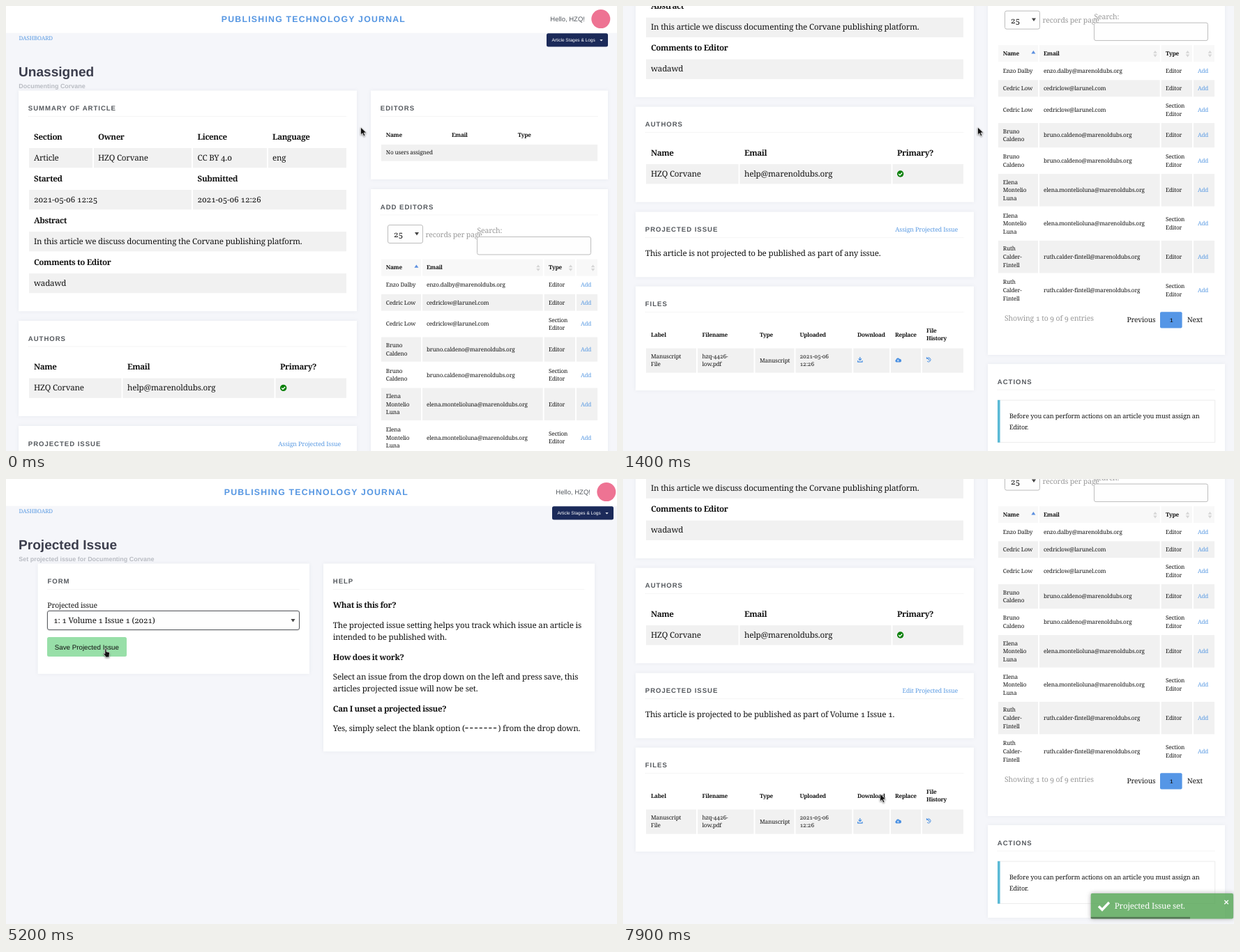
An HTML page for the animation above (8000 ms loop, 876 by 639 pixels).

```html
<!DOCTYPE html>
<html lang="en">
<head>
<meta charset="utf-8">
<title>Projected issue</title>
<style>
html, body { margin: 0; width: 100%; height: 100%; overflow: hidden; background: #f5f6fa; }
svg { display: block; width: 876px; height: 639px; }
text { font-family: "Noto Serif", serif; font-size: 11.6px; letter-spacing: -.016em; fill: #141414;
  font-variant-numeric: oldstyle-nums; text-rendering: geometricPrecision; white-space: pre; }
.b { font-weight: 700; letter-spacing: -.033em; }
.c { font-size: 9.2px; }
.s { font-size: 8.2px; letter-spacing: -.02em; }
.sb { font-size: 8.2px; font-weight: 700; letter-spacing: -.033em; }
.pick { font-size: 11.4px; font-weight: 500; }
.lab { font-size: 10.4px; }
.gray { font-size: 10.5px; fill: #999; }
.page { font-size: 10.1px; }
.link { fill: #5b9be3; }
.go { font-size: 8.8px; }
.crumb { font-size: 8px; }
.dash { font-size: 1.4em; letter-spacing: .108em; }
.sans, .title, .cap, .h1, .sub, .hello, .menu, .save { font-family: "Liberation Sans", Arial, sans-serif; letter-spacing: 0; }
.title { font-size: 12.3px; font-weight: 700; letter-spacing: .1em; fill: #5596e2; }
.cap { font-size: 9.6px; font-weight: 700; letter-spacing: .1em; fill: #55595e; }
.h1 { font-size: 19.1px; font-weight: 700; fill: #3c3e4d; }
.sub { font-size: 8.95px; font-weight: 700; fill: #b9bcc3; }
.hello { font-size: 9.5px; fill: #555a60; }
.menu { font-size: 6.5px; fill: #fff; }
.save { font-size: 9.75px; fill: #111; }
.opt { font: 10.8px "Noto Sans", "Open Sans", sans-serif; letter-spacing: 0; fill: #3a3c40; }
.toast { fill: #fff; }
.card { fill: #fff; filter: drop-shadow(0 0 2.5px rgba(40, 50, 90, .07)); }
.rule { stroke: #e6e6e6; stroke-width: .8; stroke-dasharray: 1 1; }
.cell { fill: #f1f1f1; }
.box { fill: #fefefe; stroke: #bdbdbd; }
.focus { stroke: #5c5e63; filter: drop-shadow(0 0 1.3px rgba(0, 0, 0, .25)); }
.pop { filter: drop-shadow(0 2px 3px rgba(0, 0, 0, .35)); }
.ico { fill: none; stroke: #4a90e2; stroke-width: 1.2; }
</style>
</head>
<body>
<svg id="stage" viewBox="0 0 876 639"></svg>
<script>
const T = (x, y, s, cls = "", attr = "") => `<text x="${x}" y="${y}" class="${cls}" ${attr}>${s.replace(/&/g, "&amp;")}</text>`;
const R = (x, y, w, h, attr) => `<rect x="${x}" y="${y}" width="${w}" height="${h}" ${attr}/>`;
const P = (d, attr) => `<path d="${d}" ${attr}/>`;
const G = (id, body, attr = "") => `<g id="${id}" ${attr}>${body}</g>`;
const rule = (x1, x2, y) => P(`M${x1} ${y}H${x2}`, 'class="rule"');

// Table row: shaded cells between the given edges, with thin gaps.
const cells = (y, h, edges, fill = "") => edges.slice(1).map((e, i) => {
  const x = edges[i] + (i ? 1 : 0), end = e - (i < edges.length - 2 ? 1 : 0);
  return R(x, y, end - x, h, fill || 'class="cell"');
}).join("");
const line = (y, cls, items) => items.map(([x, s]) => T(x, y, s, cls)).join("");

// Lines of text centred on y.
const stack = (x, y, s, cls = "s") => s.split("|").map((p, i, all) =>
  T(x, (y + 3 + (i - (all.length - 1) / 2) * 11.6).toFixed(1), p, cls)).join("");

const card = (x, y, w, h, title) =>
  R(x, y, w, h, 'class="card"') + T(x + 13.8, y + 28.5, title, "cap") + rule(x + 14, x + w - 14.5, y + 37);
const down = (x, y) => P(`M${x - 3} ${y - 2}h6l-3 4.4z`, 'fill="#444"');

function head(dx, title, sub) {
  const w = dx * 8;
  return R(0, 0, 876, 38.7, 'fill="#fff"')
    + T(308.8 + dx * 4, 23.2, "PUBLISHING TECHNOLOGY JOURNAL", "title")
    + T(780.3 + w, 21.8, "Hello, HZQ!", "hello")
    + `<circle cx="${852.8 + w}" cy="18.6" r="13.5" fill="#ee7393"/>`
    + R(775 + w, 39.3, 88, 19.3, 'rx="2.5" fill="#1b2a59"')
    + T(782.5 + w, 51.3, "Article Stages & Logs", "menu")
    + P(`M${851.3 + w} 48.2h4.4l-2.2 2.4z`, 'fill="#fff"')
    + T(18.5, 48.6, "DASHBOARD", "crumb link")
    + T(18, 101.2, title, "h1") + T(18.3, 117.6, sub, "sub");
}

function summary() {
  return card(18, 121.5, 485, 316.8, "SUMMARY OF ARTICLE")
    + line(191.8, "b", [[40, "Section"], [132, "Owner"], [274.5, "Licence"], [382, "Language"]])
    + cells(204, 28.3, [33, 125, 267, 375, 488])
    + line(221.8, "", [[40, "Article"], [132, "HZQ Corvane"], [274.5, "CC BY 4.0"], [382, "eng"]])
    + line(251.8, "b", [[40, "Started"], [274.5, "Submitted"]])
    + cells(264, 28.3, [33, 267, 488])
    + line(282, "", [[40, "2021-05-06 12:25"], [274.5, "2021-05-06 12:26"]])
    + T(40, 311.8, "Abstract", "b") + cells(324, 28.3, [33, 488])
    + T(40, 341.8, "In this article we discuss documenting the Corvane publishing platform.")
    + T(40, 371.8, "Comments to Editor", "b")
    + G("row", cells(384, 28.3, [33, 488], " ")) + T(40, 401.8, "wadawd");
}

function authors() {
  return card(18, 452, 485, 137, "AUTHORS")
    + line(522.4, "b", [[40, "Name"], [174, "Email"], [393, "Primary?"]])
    + cells(534.5, 28.3, [33, 166.5, 385.5, 488])
    + line(552.4, "", [[40, "HZQ Corvane"], [174, "help@marenoldubs.org"]])
    + '<circle cx="397.7" cy="548.4" r="4.7" fill="#0a800a"/>'
    + P("M395.2 548.5l1.8 1.8 3.2-3.3", 'fill="none" stroke="#fff" stroke-width="1.4"');
}

const issue = (id, link, text) => G(id,
  T(480, 631.7, link, "go link", 'text-anchor="end"') + T(32, 666.9, text));

function files() {
  const cols = [40, 113.5, 196, 253.5, 336, 390, 435];
  const names = ["Label", "Filename", "Type", "Uploaded", "Download", "Replace", "File|History"];
  const vals = ["Manuscript|File", "hzq-4426-|low.pdf", "Manuscript", "2021-05-06|12:26"];
  return card(18, 710, 485, 149.5, "FILES")
    + names.map((s, i) => stack(cols[i], 779, s, "sb")).join("")
    + cells(799, 35, [33, 106, 188.5, 246.5, 329.3, 383, 428, 488])
    + vals.map((s, i) => stack(cols[i], 816, s)).join("")
    + P("M339.8 811.5v4.4m-2.2-2.2l2.2 2.3 2.2-2.3M336.7 816.5v2h6.3v-2", 'class="ico"')
    + P("M392 819a2 2 0 0 1-.4-3.8 2.6 2.6 0 0 1 4.8-1 2.4 2.4 0 0 1 .6 4.8z", 'fill="#4a90e2"')
    + P("M394.3 818v-2.6m-1.2 1.2l1.2-1.2 1.2 1.2", 'fill="none" stroke="#fff" stroke-width=".8"')
    + P("M435.8 813.4a3 3 0 1 1 .3 4.2M435.4 811.6v2.3h2.2M438.3 813.6v2.2h1.5", 'class="ico" style="stroke-width:1"');
}

function sorter(x) {
  return P(`M${x - 2.8} 375.2h5.6l-2.8-3.8zM${x - 2.8} 377h5.6l-2.8 3.8z`, 'fill="#d6d6d6"');
}

const people = [
  ["Enzo Dalby", "enzo.dalby@marenoldubs.org", "E"],
  ["Cedric Low", "cedriclow@larunel.com", "ES"],
  ["Bruno|Caldeno", "bruno.caldeno@marenoldubs.org", "ES"],
  ["Elena|Montelio|Luna", "elena.montelioluna@marenoldubs.org", "ES"],
  ["Ruth|Calder-|Fintell", "ruth.calder-fintell@marenoldubs.org", "ES"]
];

function roster() {
  const edges = [538, 596, 770.7, 817, 848];
  const heights = [0, 25.2, 36.5, 47.9];
  let y = 387.8, n = 0, out = cells(363.6, 24, edges, 'fill="#f8f8f8"')
    + line(378, "sb", [[544.8, "Name"], [603, "Email"], [778, "Type"]])
    + P("M585.4 375.8h6l-3-4.4z", 'fill="#5b8fe0"') + [763, 809.5, 841.5].map(sorter).join("");
  for (const [name, mail, roles] of people) for (const r of roles) {
    const role = r === "E" ? "Editor" : "Section|Editor";
    const h = heights[Math.max(name.split("|").length, role.split("|").length)];
    const mid = y + h / 2;
    if (n++ % 2) out += cells(y + .8, h - 1.4, edges);
    out += stack(544.8, mid, name) + stack(603, mid, mail) + stack(778, mid, role) + stack(824, mid, "Add", "s link");
    y += h;
  }
  return out;
}

function sidebar() {
  return card(523, 121.5, 340, 127.5, "EDITORS")
    + line(187.6, "sb", [[544.8, "Name"], [639, "Email"], [733.7, "Type"]])
    + cells(199, 23.7, [538, 848]) + T(544.8, 213, "No users assigned", "s")
    + card(523, 263, 340, 545.4, "ADD EDITORS")
    + R(547.5, 314.5, 50, 26, 'rx="2.5" class="box"') + T(556, 332.3, "25", "pick") + down(589, 327)
    + T(601.5, 331.8, "records per page", "gray") + T(675.5, 326, "Search:", "gray")
    + R(675.5, 331.5, 163, 25.5, 'rx="2.5" class="box"')
    + roster()
    + T(547, 759.3, "Showing 1 to 9 of 9 entries", "gray")
    + T(722.5, 761.6, "Previous", "page") + R(770, 746.6, 31.6, 23.2, 'rx="2" fill="#5596e6"')
    + T(783.2, 761.8, "1", "page") + T(809, 761.6, "Next", "page")
    + card(523, 821.5, 340, 133, "ACTIONS")
    + R(537.5, 873.5, 311.2, 60.5, 'fill="#fff" stroke="#ececec"') + R(537, 873.2, 3.6, 61, 'fill="#5bbad6"')
    + T(554, 899.4, "Before you can perform actions on an article you must assign an", "c")
    + T(554, 915.8, "Editor.", "c");
}

function article() {
  return head(0, "Unassigned", "Documenting Corvane") + summary() + authors()
    + card(18, 603, 485, 93.7, "PROJECTED ISSUE")
    + issue("before", "Assign Projected Issue", "This article is not projected to be published as part of any issue.")
    + issue("after", "Edit Projected Issue", "This article is projected to be published as part of Volume 1 Issue 1.")
    + files() + sidebar();
}

const dashes = n => `<tspan class="dash">${"-".repeat(n)}</tspan>`;
const chosen = "1: 1 Volume 1 Issue 1 (2021)";

function form() {
  return head(1, "Projected Issue", "Set projected issue for Documenting Corvane")
    + card(45.6, 121.5, 389.4, 158.3, "FORM")
    + T(59.3, 184.8, "Projected issue", "lab")
    + R(59.5, 189.5, 361, 27, 'rx="2.5" class="box" id="field"') + down(411.5, 203)
    + G("blank", T(68.5, 207.6, dashes(9), "pick")) + G("value", T(68, 207, chosen, "pick"))
    + R(59, 227, 114, 28, 'rx="2.5" fill="#98dfa8"') + T(69.8, 244.6, "Save Projected Issue", "save")
    + G("menu", R(59, 217, 362, 41.5, 'fill="#f3f4f5" class="pop"')
      + R(59, 217, 362, 20.5, 'id="opt1"') + R(59, 237.5, 362, 21, 'id="opt2"')
      + T(67, 231, "---------", "opt") + T(67, 252.2, chosen, "opt"))
    + card(455, 121.5, 389, 269.8, "HELP")
    + T(468.8, 185.3, "What is this for?", "b")
    + T(468.8, 213.6, "The projected issue setting helps you track which issue an article is")
    + T(468.8, 231.2, "intended to be published with.")
    + T(468.8, 259.7, "How does it work?", "b")
    + T(468.8, 287.8, "Select an issue from the drop down on the left and press save, this")
    + T(468.8, 305.4, "articles projected issue will now be set.")
    + T(468.8, 333.6, "Can I unset a projected issue?", "b")
    + T(468.8, 362, `Yes, simply select the blank option (${dashes(7)}) from the drop down.`);
}

function toast() {
  return R(670.7, 595, 204.3, 36.5, 'rx="2" fill="#51a351" style="filter:drop-shadow(0 0 3px #999)"')
    + P("M682 613.5l5 5L697 608", 'fill="none" stroke="#fff" stroke-width="3.4"')
    + T(704.8, 617.3, "Projected Issue set.", "toast")
    + T(861.2, 612, "×", "sans toast", 'style="font-size:13px;font-weight:700"')
    + R(670.7, 628.9, 0, 2.6, 'id="bar" fill="#000" opacity=".45"');
}

const stage = document.getElementById("stage");
stage.innerHTML = G("article", article()) + G("form", form()) + G("toast", toast(), 'opacity=".8"')
  + G("cursor", G("arrow", P("M0 0V11L2.6 8.7 4.4 12.8 6.4 11.9 4.6 8H8.2Z", ""))
    + G("hand", P("M-1.2 1.2a1.1 1.1 0 0 1 2.2 0V4.4l3.3.7q1.3.4 1.2 1.8L5 10.4V12.4H-.6V11L-3.6 7.2q.3-1.5 2.4.2Z", "")),
    'fill="#111" stroke="#fff" stroke-width=".7" style="filter:drop-shadow(.5px 1px 1px rgba(0,0,0,.45))"');

const scrollKeys = [[0, 0], [400, 0], [500, 20], [700, 151.4], [800, 190], [900, 205], [1100, 205], [1200, 222],
  [1400, 307.4], [1500, 324.4], [3200, 324.4], [3300, 0], [6400, 0], [6500, 6.8], [6600, 151.4], [7000, 151.4],
  [7100, 190], [7200, 280], [7300, 324.4]];
const cursorKeys = [[0, 508.5, 174], [1600, 508.5, 174], [2400, 436, 303], [3200, 436, 303], [3500, 270, 200],
  [3700, 270, 200], [4000, 266, 231], [4300, 262, 246], [4600, 262, 246], [5000, 143, 243.5], [5400, 143, 243.5],
  [5900, 385.8, 382.5], [7700, 385.8, 382.5], [7900, 368.6, 452]];

function at(keys, t) {
  const i = keys.findIndex(k => k[0] > t);
  if (i < 0) return keys[keys.length - 1].slice(1);
  const a = keys[i - 1], b = keys[i], p = (t - a[0]) / (b[0] - a[0]);
  return a.slice(1).map((v, j) => v + (b[j + 1] - v) * p);
}

const el = id => document.getElementById(id);
const show = (id, on) => el(id).style.display = on ? "" : "none";
const set = (id, name, v) => el(id).setAttribute(name, v);

function draw(now) {
  const t = Math.floor(now % 8000 / 100) * 100;
  const within = (a, b) => t >= a && t < b;
  const onForm = within(3300, 5500), saved = t >= 5500;
  show("article", !onForm);
  show("form", onForm);
  show("before", !saved);
  show("after", saved);
  set("article", "transform", `translate(0 ${-at(scrollKeys, t)[0]})`);
  set("row", "fill", within(5900, 6600) ? "#eaeaea" : "#f1f1f1");

  set("field", "class", t >= 3700 ? "box focus" : "box");
  show("menu", within(3700, 4700));
  show("blank", t < 4700);
  show("value", t >= 4700);
  const second = t >= 4200;
  set("opt1", "fill", second ? "#f3f4f5" : "#d5d5d5");
  set("opt2", "fill", second ? "#d5d5d5" : "#f3f4f5");

  show("toast", t >= 5900);
  set("bar", "width", Math.max(0, 179.3 - (t - 6500) * .02643));

  const hand = within(2200, 3300) || within(4900, 5500);
  show("hand", hand);
  show("arrow", !hand);
  set("cursor", "transform", `translate(${at(cursorKeys, t).join(" ")})`);
}

const start = performance.now();
function tick() {
  draw(performance.now() - start);
  requestAnimationFrame(tick);
}
draw(0);
requestAnimationFrame(tick);
</script>
</body>
</html>
```
